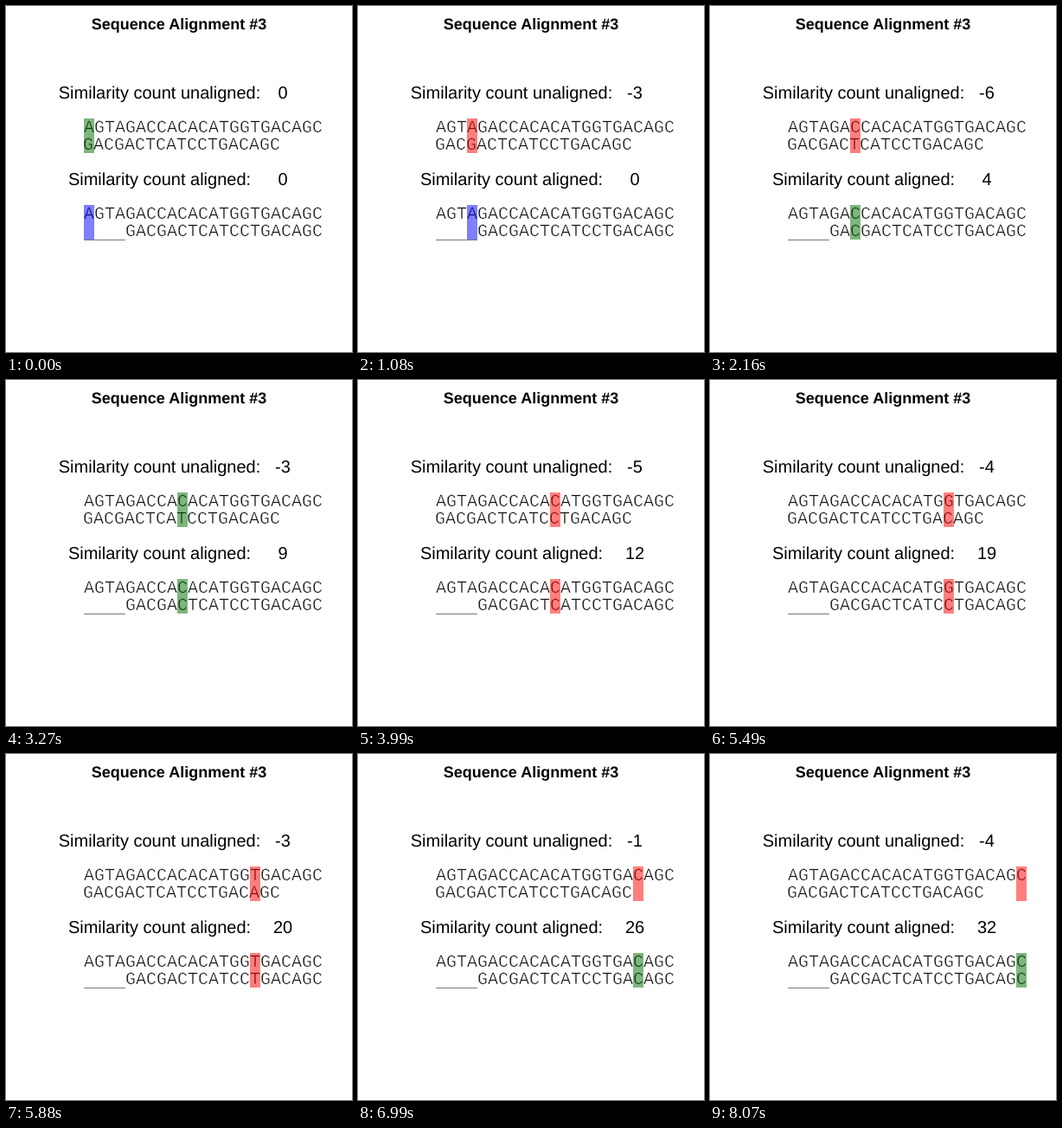
Write an HTML page that moves like this. It is 400 by 400 pixels and loops after 9990 ms.

```html
<!DOCTYPE html>
<html lang="en">
<head>
<meta charset="utf-8">
<title>Sequence Alignment</title>
<style>
html, body { margin: 0; width: 100%; height: 100%; overflow: hidden; background: #fff; }
svg { display: block; width: 100vw; height: 100vh; }
text { fill: #000; white-space: pre; text-rendering: geometricPrecision; }
.title { font: bold 18px "Liberation Sans", Arial, sans-serif; text-anchor: middle; }
.label { font: 20px "Liberation Sans", Arial, sans-serif; text-anchor: middle; }
/* The white outline thins the strokes of the letters. */
.seq { font: 20px "Courier New", "Liberation Mono", monospace; fill: #111; stroke: #fff; stroke-width: .5px; }
.gap { stroke: #777; stroke-width: 1px; }
rect { opacity: .5; }
</style>
</head>
<body>
<svg id="stage" viewBox="0 0 400 400">
  <text class="title" x="200" y="27">Sequence Alignment #3</text>
</svg>
<script>
const LOOP = 9990;
const CELL = 12, LEFT = 90;
const TOP = "AGTAGACCACACATGGTGACAGC";
const LOWER = "GACGACTCATCCTGACAGC";
const PAIRS = ["AT", "TA", "CG", "GC"];
const GREEN = "#006d00", RED = "#ff0000", BLUE = "#0000ff";
const TIMES = [0, 360, 720, 1080, 1440, 1800, 2160, 2520, 2880, 3270, 3630, 3990,
  4350, 4710, 5100, 5490, 5880, 6240, 6600, 6990, 7350, 7710, 8070];
const stage = document.getElementById("stage");

function add(tag, attrs, text = "") {
  const el = document.createElementNS("http://www.w3.org/2000/svg", tag);
  for (const key in attrs) el.setAttribute(key, attrs[key]);
  el.textContent = text;
  return stage.appendChild(el);
}

function compare(a, b) {
  if (b === "_") return { points: 0, color: BLUE };
  if (a === b) return { points: 2, color: GREEN };
  return { points: PAIRS.includes(a + b) ? 1 : -1, color: RED };
}

// Score and colour at each step reflect the columns already passed.
function scoreSteps(lower, color) {
  let score = 0;
  return [...TOP].map((letter, i) => {
    const step = { score, color };
    const result = compare(letter, lower[i]);
    score += result.points;
    color = result.color;
    return step;
  });
}

function makePanel({ y, name, gap, lowerX, color }) {
  add("text", { class: "label", x: 177.5, y: y - 23 }, `Similarity count ${name}:`);
  const count = add("text", { class: "label", x: 320, y: y - 23 });
  add("text", { class: "seq", x: LEFT, y: y + 16 }, TOP);
  add("text", { class: "seq", x: lowerX, y: y + 36 }, LOWER);
  if (gap) add("path", { class: "gap", d: `M${LEFT} ${y + 40.5}h${gap * CELL}` });
  const bar = add("rect", { y, width: CELL, height: 40 });
  return { count, bar, steps: scoreSteps("_".repeat(gap) + LOWER, color) };
}

const panels = [
  makePanel({ y: 130, name: "unaligned", gap: 0, lowerX: LEFT - 1, color: GREEN }),
  makePanel({ y: 230, name: "aligned", gap: 4, lowerX: LEFT + 4 * CELL, color: BLUE })
];

let shown = -1;
function show(i) {
  if (i === shown) return;
  shown = i;
  for (const { count, bar, steps } of panels) {
    count.textContent = steps[i].score;
    bar.setAttribute("x", LEFT + CELL * i);
    bar.setAttribute("fill", steps[i].color);
  }
}

const start = performance.now();
function tick() {
  const time = (performance.now() - start) % LOOP;
  show(TIMES.findLastIndex(t => t <= time));
  requestAnimationFrame(tick);
}
tick();
</script>
</body>
</html>
```
